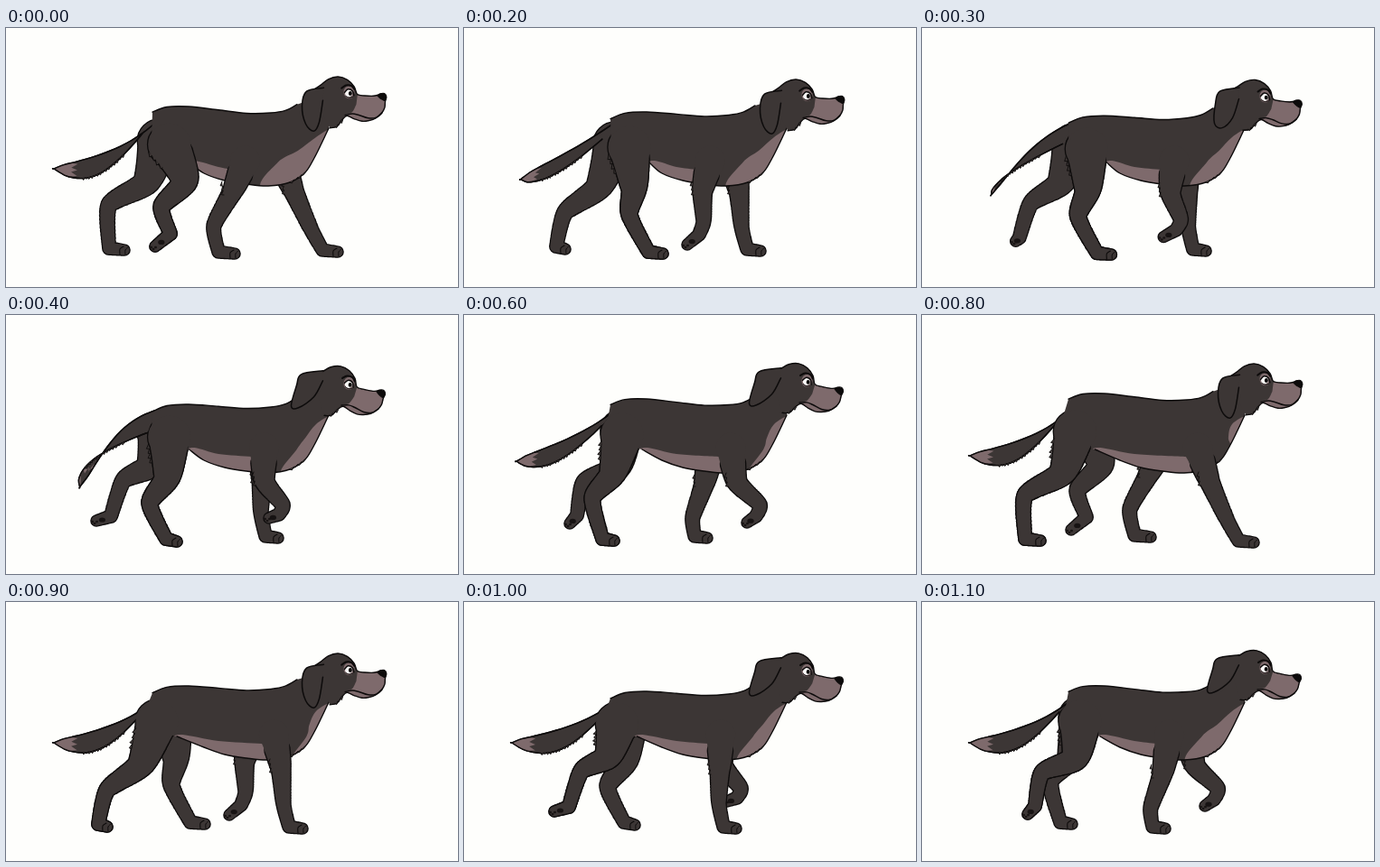
These frames come from a looping animation (500x287 px, 1200 ms). An HTML page with a canvas:

```html
<!DOCTYPE html>
<html lang="en">
<head>
<meta charset="utf-8">
<title>Dog walk cycle</title>
<style>
html, body { margin: 0; width: 100%; height: 100%; overflow: hidden; background: #fefefc; }
canvas { display: block; width: 500px; height: 287px; }
</style>
</head>
<body>
<canvas id="stage"></canvas>
<script>
const COAT = '#3c3635', PINK = '#7e6a6c', INK = '#0d0b0b', PAD = '#171313';
const STEP = 100;
// Walk phase (eight to a cycle) shown in each step; halves are in-betweens.
const PHASES = [0, 0.5, 1, 1.5, 2, 2, 3, 3.5, 4, 5, 6, 7];

const points = text => text.split(' ').map(pair => pair.split(',').map(Number));
const mix = (a, b, t) => a.map((v, i) => v + (b[i] - v) * t);
const add = (p, x, y) => [p[0] + x, p[1] + y];

// One stride per kind of leg: knee, hock, ankle, toe at each phase.
// The far legs walk the same stride half a cycle later.
const HIND = [
  '198,169 172,198 182,228 165,242',
  '188,177 183,207 204,248 220,250',
  '178,180 159,209 177,248 189,251',
  '164,176 142,203 153,248 166,250',
  '155,175 114,200 114,248 131,250',
  '149,180 112,208 102,246 112,249',
  '159,171 130,187 116,227 100,232',
  '169,173 133,189 125,226 117,235'
].map(points);
const FORE = [
  '251,180 230,219 235,248 253,250',
  '264,180 265,214 260,229 247,240',
  '286,184 306,210 302,221 291,225',
  '302,185 327,210 323,223 313,230',
  '318,184 337,226 350,250 367,252',
  '304,184 307,224 313,249 328,251',
  '283,186 282,223 287,249 301,251',
  '266,190 253,228 255,249 269,251'
].map(points);
const HIND_RADII = [24, 14, 9, 7.2, 6];
const FORE_RADII = [17, 11, 8, 7, 6];

// Head shapes, relative to the eye.
const SKULL = points('-42,-4 -31,-10 -22,-16 -11,-18 -1,-14 6,-6 9,3 17,5 27,6 34,5 40,7 39,14 38,20 34,26 27,31 19,33 12,33 4,30 -4,26 -10,30 -16,37 -24,38');
const MUZZLE = points('9,4 17,5.5 31,6 39,13 38,20 34,26 27,31 19,33 12,33 4,30 -5,25 2,22 7,14');
const NOSE = points('31,6 34,4 39,4 41,8 39,12 35,10 31,6');
const MOUTH = points('35,25 28,30 19,30 9,26 2,24 -6,25');
const EAR_DOWN = points('-28,-5 -47,-1 -52,15 -48,35 -39,43 -33,33 -29,9');
const EAR_BACK = points('-29,-14 -53,-10 -58,2 -64,25 -56,27 -39,15 -29,-3');

const canvas = document.getElementById('stage');
const ctx = canvas.getContext('2d');
const ratio = window.devicePixelRatio || 1;
canvas.width = 500 * ratio;
canvas.height = 287 * ratio;
ctx.scale(ratio, ratio);
ctx.lineJoin = ctx.lineCap = 'round';

// The body bobs twice per cycle.
const wave = (k, mean, c, s = 0) =>
  mean + c * Math.cos(k * Math.PI / 2) + s * Math.sin(k * Math.PI / 2);

// Joints of a stride at phase k, eased through its neighbours.
function stride(keys, k, dy) {
  const i = Math.floor(k), t = k - i;
  const [a, b, c, d] = [7, 8, 9, 10].map(n => keys[(i + n) % 8]);
  const ease = (p, q, r, s) =>
    q + t / 2 * (r - p + t * (2 * p - 5 * q + 4 * r - s + t * (3 * (q - r) + s - p)));
  return b.map((p, j) => [
    ease(a[j][0], p[0], c[j][0], d[j][0]),
    ease(a[j][1], p[1], c[j][1], d[j][1]) + dy
  ]);
}

function hindLeg(k, dy = 0) {
  const hip = [175 + 8 * Math.cos((k - 1) * Math.PI / 4), wave(k, 132, -3) + dy];
  return limb([hip, ...stride(HIND, k, dy)], HIND_RADII);
}

function foreLeg(k, dy = 0) {
  const joints = stride(FORE, k, dy);
  return limb([[285 + (joints[0][0] - 285) * 0.6, 147], ...joints], FORE_RADII);
}

// Circles strung along the joints; the paw is the straight last stretch.
function limb(joints, radii) {
  const last = joints.length - 1, rounds = [], steps = 14;
  const slope = i => {
    if (i >= last - 1) return mix(joints[i - 1], joints[i], 0).map((v, n) => (joints[i][n] - v) * 0.4);
    return joints[i].map((v, n) => (joints[i + 1][n] - joints[Math.max(0, i - 1)][n]) * 0.32);
  };
  for (let i = 0; i < last; i++) {
    const m = slope(i), n = slope(i + 1);
    for (let s = 0; s <= steps; s++) {
      const t = s / steps, u = 1 - t;
      const at = i === last - 1
        ? mix(joints[i], joints[i + 1], t)
        : joints[i].map((v, c) => v * u * u * (1 + 2 * t) + joints[i + 1][c] * t * t * (3 - 2 * t)
          + m[c] * t * u * u - n[c] * t * t * u);
      rounds.push([...at, radii[i] + (radii[i + 1] - radii[i]) * t]);
    }
  }
  return { joints, rounds };
}

function tube(rounds, outline) {
  const path = new Path2D();
  for (const [x, y, r] of rounds) {
    path.moveTo(x + r - 0.5, y);
    path.arc(x, y, r - 0.5, 0, Math.PI * 2);
  }
  if (outline) {
    ctx.strokeStyle = INK;
    ctx.lineWidth = 2.6;
    ctx.stroke(path);
  } else {
    ctx.fillStyle = COAT;
    ctx.fill(path);
  }
}

function drawLeg({ joints, rounds }, hidden = 0) {
  tube(rounds.slice(hidden), true);
  tube(rounds);
  const [ankle, toe] = joints.slice(-2);
  if (toe[0] < ankle[0]) {
    dot(...add(mix(ankle, toe, 0.6), 0, 1), 3.6, 2.6, PAD);
    for (const side of [-1, 0, 1]) dot(...add(toe, side * 2.5 - 2, 3 - Math.abs(side) * 2), 1.5, 1.3, PAD);
  } else {
    shape([add(toe, -1, -4), add(toe, -5, -1), add(toe, -5, 5)], null, 1.1);
    shape([add(toe, 4, -3), add(toe, 1, 0), add(toe, 1, 5)], null, 1);
  }
}

// Smooth curve through the points.
function curve(pts, path = new Path2D()) {
  path.lineTo(...pts[0]);
  for (let i = 0; i < pts.length - 1; i++) {
    const p = pts[i], q = pts[i + 1];
    const before = pts[i - 1] || p, after = pts[i + 2] || q;
    path.bezierCurveTo(
      p[0] + (q[0] - before[0]) / 6, p[1] + (q[1] - before[1]) / 6,
      q[0] - (after[0] - p[0]) / 6, q[1] - (after[1] - p[1]) / 6, ...q);
  }
  return path;
}

function shape(pts, fill, line = 1.4) {
  const path = curve(pts);
  if (fill) { ctx.fillStyle = fill; ctx.fill(path); }
  if (line) { ctx.strokeStyle = INK; ctx.lineWidth = line; ctx.stroke(path); }
  return path;
}

function dot(x, y, rx, ry, color) {
  ctx.fillStyle = color;
  ctx.beginPath();
  ctx.ellipse(x, y, rx, ry, 0, 0, Math.PI * 2);
  ctx.fill();
}

// Row of hair spikes on the left of the way from a to b.
function fur(a, b, count, height, lean = 0.9) {
  const dx = b[0] - a[0], dy = b[1] - a[1], len = Math.hypot(dx, dy) || 1;
  ctx.beginPath();
  ctx.moveTo(...a);
  for (let i = 0; i < count; i++) {
    const h = height * (i % 2 ? 0.7 : 1) / len;
    const tip = mix(a, b, (i + lean) / count);
    ctx.lineTo(tip[0] - dy * h, tip[1] + dx * h);
    ctx.lineTo(...mix(a, b, (i + 1) / count));
  }
  ctx.fillStyle = COAT;
  ctx.fill();
  ctx.lineWidth = 0.9;
  ctx.strokeStyle = INK;
  ctx.stroke();
}

function drawTail(k) {
  const drop = Math.max(0, Math.cos((k - 1.9) * Math.PI / 4)) ** 4;
  const base = [161, wave(k, 113, -5)];
  const bend = [110 - 11 * drop, 166 - 27 * drop];
  const tip = [53 + 29 * drop, 156 + 35 * drop];
  const upper = [], lower = [];
  for (let i = 0; i <= 10; i++) {
    const t = i / 10;
    const p = mix(base, bend, t), q = mix(bend, tip, t), c = mix(p, q, t);
    const len = Math.hypot(q[0] - p[0], q[1] - p[1]);
    const w = (13 * Math.sqrt(1 - t) + 18 * t * (1 - t)) / len;
    const nx = (p[1] - q[1]) * w, ny = (q[0] - p[0]) * w;
    upper.push(add(c, -nx, ny));
    lower.unshift(add(c, nx, -ny));
  }
  const outline = [...upper, ...lower];
  const path = shape(outline, COAT);
  ctx.save();
  ctx.clip(path);
  ctx.fillStyle = PINK;
  ctx.beginPath();
  for (let i = 0; i <= 6; i++) ctx.lineTo(...mix(mix(upper[8], lower[2], i / 6), tip, i % 2 ? -0.15 : 0.15));
  ctx.lineTo(...add(tip, 0, 30));
  ctx.lineTo(...add(tip, -30, 0));
  ctx.lineTo(...add(tip, 0, -20));
  ctx.fill();
  ctx.restore();
  shape(outline);
  for (let i = 3; i < 8; i++) fur(lower[i], lower[i + 1], 3, 2, 0.2);
}

function drawBody(k, eye, hip, shoulder) {
  const back = points('162,100 178,94 202,93 235,96 266,99 293,98 309,95 322,88')
    .map(([x, y]) => [x, wave(k, y, -6.5 + (x - 178) / 45, (200 - x) / 60)]);
  const under = [
    ...points('357,111 349,128 341,144 331,160 314,171 290,175 266,173 242,169 219,161'),
    [hip[0] + 22, 149]
  ];
  const body = curve(back);
  body.lineTo(...add(eye, -20, 0));
  curve(under, body);
  body.lineTo(...add(hip, -20, 6));
  ctx.fillStyle = COAT;
  ctx.fill(body);

  const end = shoulder[0] - 4, low = shoulder[0] + 18;
  ctx.save();
  ctx.clip(body);
  shape([[hip[0] + 16, 150], [hip[0] + 28, 147], [235, 154], [end - 10, 157], [end, 158], [end - 3, 174], [end - 12, 185], [200, 185]], PINK, 0);
  shape([[360, 110], [343, 121], [low + (343 - low) * 0.6 + 4, 136], [low + 18, 149], [low, 178], [340, 190], [380, 130]], PINK, 0);
  ctx.restore();
  shape(back);
  shape(under);
  fur(under[4], under[3], 4, 2, 0.3);
}

function drawHead(k, eye) {
  const sweep = wave(k, 0.5, -0.5, -0.5);
  ctx.save();
  ctx.translate(...eye);
  ctx.save();
  ctx.rotate((sweep * 9.5 - 4) * Math.PI / 180);
  shape(SKULL, COAT, 0);
  shape(MUZZLE, PINK, 0);
  shape(SKULL);
  shape(MOUTH, null, 1.5);
  shape(NOSE, INK, 1);
  dot(0, 0, 6, 7, PINK);
  dot(-0.5, 1, 4, 4.3, '#fbfaf8');
  dot(1.3, 1.4, 2, 2.4, INK);
  shape([[-5, 0], [-1, -3.5], [4, -1], [5, 4]], null, 1.5);
  shape([[-4, 4], [0, 6], [4, 5]], null, 0.9);
  shape([[-8, -5], [-3, -8], [3, -7], [6, -3]], null, 2);
  fur([-9, 30], [-18, 37], 3, -2);
  ctx.restore();
  shape(EAR_DOWN.map((p, i) => mix(p, EAR_BACK[i], sweep)), COAT, 1.5);
  ctx.restore();
}

function draw(k) {
  ctx.fillStyle = '#fefefc';
  ctx.fillRect(0, 0, 500, 287);
  const hind = hindLeg(k), fore = foreLeg(k), farFore = foreLeg(k + 4, -4);
  const [hip, knee] = hind.joints, [shoulder, elbow] = fore.joints;
  const eye = [379.5, wave(k, 73.5, -2.3, 0.7)];

  drawLeg(hindLeg(k + 4, -4));
  drawLeg(farFore);
  fur(add(farFore.joints[1], -11, -9), add(farFore.joints[1], -10, 4), 3, 2.5);
  tube(hind.rounds, true);
  drawTail(k);
  drawBody(k, eye, hip, shoulder);
  drawLeg(hind, 5);
  fur(add(hip, -23, 8), add(mix(hip, knee, 0.6), -18, 2), 4, 3);
  drawLeg(fore, 7);
  fur(add(elbow, -12, -10), add(elbow, -10, 5), 3, 2.5);
  drawHead(k, eye);
}

const start = performance.now();
function tick() {
  const step = Math.floor((performance.now() - start) / STEP) % PHASES.length;
  draw(PHASES[step]);
  requestAnimationFrame(tick);
}
tick();
</script>
</body>
</html>
```
